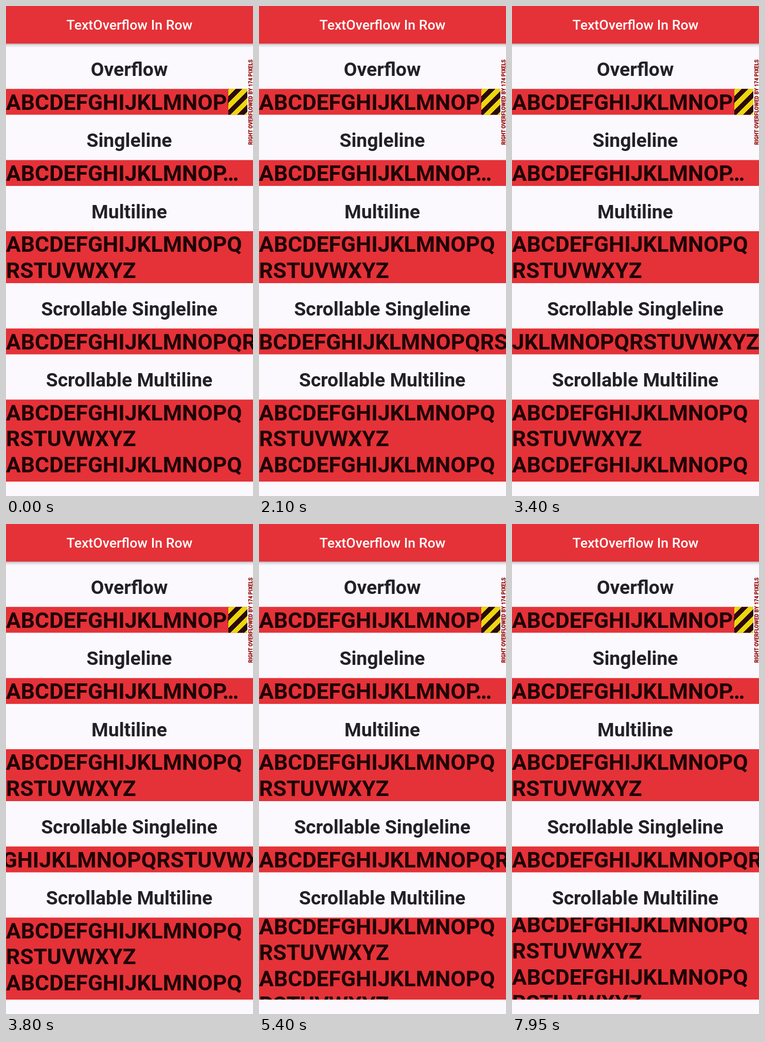
Write an HTML page that moves like this. It is 480 by 953 pixels and loops after 8000 ms.

```html
<!DOCTYPE html>
<html lang="en">
<head>
<meta charset="utf-8">
<title>TextOverflow In Row</title>
<style>
  html, body { margin: 0; width: 100%; height: 100%; overflow: hidden; background: #fbf9fd; }
  svg { display: block; width: 100%; height: 100%; font-family: Roboto, sans-serif; }
  .band { fill: #e43238; }
  .head { font-size: 37.33px; font-weight: 700; fill: #222126; text-anchor: middle; }
  .body { font-size: 42.67px; font-weight: 700; fill: #1e0406; }
  .title { font-size: 26.67px; font-weight: 500; fill: #fff; text-anchor: middle; }
  .warn { font-size: 10px; font-weight: 800; fill: #900000; text-anchor: middle; }
</style>
</head>
<body>
<svg id="stage" viewBox="0 0 480 953">
  <defs>
    <linearGradient id="shade" x2="0" y2="1">
      <stop offset="0" stop-color="#000" stop-opacity=".3"/>
      <stop offset=".4" stop-color="#000" stop-opacity=".1"/>
      <stop offset="1" stop-color="#000" stop-opacity="0"/>
    </linearGradient>
    <linearGradient id="tape" gradientUnits="userSpaceOnUse" spreadMethod="repeat"
        x1="0" y1="161" x2="13.333" y2="174.333">
      <stop offset=".25" stop-color="#2a0a0c"/>
      <stop offset=".25" stop-color="#ecd60e"/>
      <stop offset=".75" stop-color="#ecd60e"/>
      <stop offset=".75" stop-color="#2a0a0c"/>
    </linearGradient>
    <clipPath id="view"><rect y="765.5" width="480" height="159.5"/></clipPath>
  </defs>
</svg>
<script>
const NS = 'http://www.w3.org/2000/svg';
const stage = document.getElementById('stage');
const LOOP = 8000, LINE = 50.6;
const FIRST = 'ABCDEFGHIJKLMNOPQ', REST = 'RSTUVWXYZ';

function add(tag, attrs, text = '', parent = stage) {
  const el = document.createElementNS(NS, tag);
  for (const key in attrs) el.setAttribute(key, attrs[key]);
  el.textContent = text;
  return parent.appendChild(el);
}
const rect = (x, y, width, height, attrs) => add('rect', { x, y, width, height, ...attrs });
const band = (y, h) => rect(0, y, 480, h, { class: 'band' });
const head = (y, text) => add('text', { class: 'head', x: 239.5, y }, text);
const lines = (y, list, parent) => list.map((text, i) =>
  add('text', { class: 'body', x: 0, y: y + i * LINE }, text, parent));

rect(0, 73, 480, 8, { fill: 'url(#shade)' });
rect(0, 0, 480, 73, { class: 'band' });
add('text', { class: 'title', x: 240, y: 46 }, 'TextOverflow In Row');

head(136, 'Overflow');
band(161.2, 50.3);
lines(201.5, [FIRST + REST]);
rect(432, 161.2, 48, 50.3, { fill: 'url(#tape)' });
rect(469, 103, 11, 168, { fill: '#fbf9fd' });
add('text', { class: 'warn', transform: 'translate(478.6 187) rotate(-90)' },
  'RIGHT OVERFLOWED BY 174 PIXELS');

head(274.3, 'Singleline');
band(299.6, 50.3);
lines(339.8, ['ABCDEFGHIJKLMNOP…']);

head(412.8, 'Multiline');
band(438, 101);
lines(478.3, [FIRST, REST]);

head(602, 'Scrollable Singleline');
band(627.2, 50.3);
const [row] = lines(667.5, [FIRST + REST]);

head(740, 'Scrollable Multiline');
band(765.5, 159.5);
const view = add('g', { 'clip-path': 'url(#view)' });
const column = add('g', {}, '', view);
lines(805.7, [FIRST, REST, FIRST, REST], column);

// Smooth progress from 0 to 1 between two times
function ease(t, from, to) {
  const u = Math.min(1, Math.max(0, (t - from) / (to - from)));
  return u * u * (3 - 2 * u);
}

function draw(t) {
  const x = 232 * (ease(t, 1828, 3066) - ease(t, 3345, 4645));
  const y = 44 * (ease(t, 5250, 5800) - ease(t, 7670, 8090));
  row.setAttribute('x', -x);
  column.setAttribute('transform', `translate(0 ${-y})`);
}

function tick(now) {
  draw(now % LOOP);
  requestAnimationFrame(tick);
}
draw(0);
requestAnimationFrame(tick);
</script>
</body>
</html>
```
